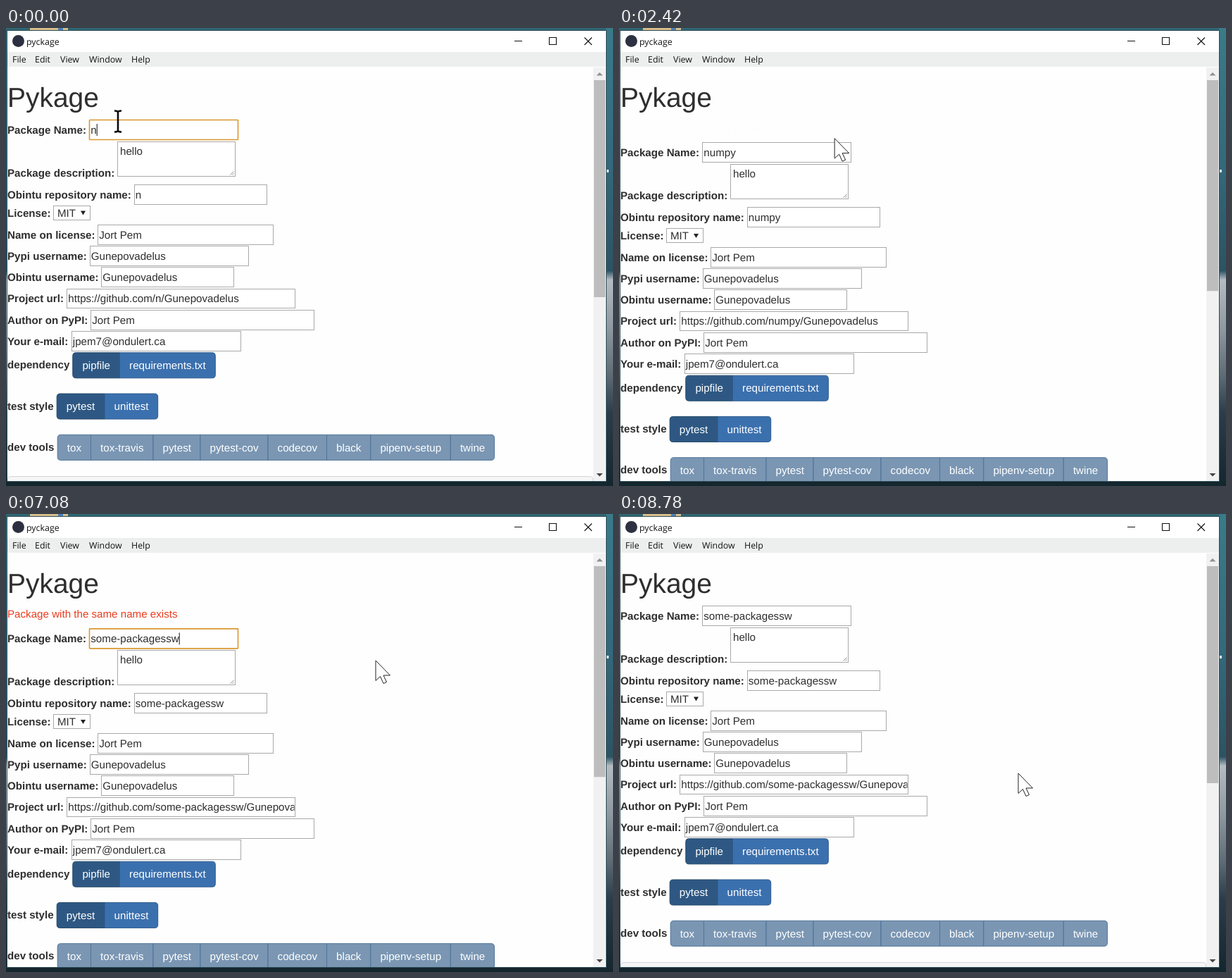
Recreate the animation shown at these times as an HTML page. Size 862 by 650 pixels, loop 8.86 s.

```html
<!DOCTYPE html>
<html lang="en">
<head>
<meta charset="utf-8">
<title>Pykage</title>
<style>
  html, body { margin: 0; width: 100%; height: 100%; overflow: hidden; background: #14262e; }
  svg { display: block; width: 862px; height: 650px; }
  text { font: 15.15px "Liberation Sans", Arial, sans-serif; fill: #2e2e2e; white-space: pre; text-rendering: geometricPrecision; }
  .ui { font: 12.4px "Open Sans", sans-serif; fill: #111; }
  .label { font-weight: bold; }
  .heading { font-size: 38.95px; }
  .on-blue { fill: #fff; }
  .box { fill: #fff; stroke: #a9a9a9; shape-rendering: crispEdges; }
</style>
</head>
<body>
<svg id="stage" viewBox="0 0 862 650"></svg>
<script>
const LOOP = 8860;
const STEP = 75;
const USER = "Gunepovadelus";
const PERSON = "Jort Pem";

const text = (x, y, content, cls = "", id = "") =>
  `<text x="${x}" y="${y}" class="${cls}" id="${id}">${content}</text>`;
const rect = (x, y, w, h, attrs) => `<rect x="${x}" y="${y}" width="${w}" height="${h}" ${attrs}/>`;
const box = (left, top, right, bottom) =>
  rect(left + 0.5, top + 0.5, right - left - 1, bottom - top - 1, 'class="box"');

// One labelled input; its text starts just inside the left edge.
const field = (label, left, right, baseline, value = "", id = "") =>
  text(2, baseline, label, "label") + box(left, baseline - 20, right, baseline + 9) +
  text(left + 2.3, baseline, value, "", id);

// Joined buttons: edges gives the left side of each and the right side of the last.
function buttons(label, top, edges, names, styleOf) {
  const last = names.length - 1;
  const right = edges[last + 1];
  let out = text(2, top + 22.5, label, "label");
  names.forEach((name, i) => {
    const [fill, stroke] = styleOf(i);
    const x = edges[i], end = edges[i + 1], r = 4.5;
    const a = i === 0 ? r : 0, b = i === last ? r : 0;
    out += `<path d="M${x + a} ${top}H${end - b}q${b} 0 ${b} ${b}V${top + 36 - b}q0 ${b} ${-b} ${b}
      H${x + a}q${-a} 0 ${-a} ${-a}V${top + a}q0 ${-a} ${a} ${-a}z" fill="${fill}" stroke="${stroke}"/>` +
      text(x + 13.6, top + 23.3, name, "on-blue");
  });
  return out;
}
const choice = i => i === 0 ? ["#2e5883", "#234868"] : ["#3b70ae", "#2d5b8d"];
const disabled = () => ["#7a96b3", "#4f7398"];

const desktop = `
  <defs>
    <linearGradient id="sky" x2="0" y2="1">
      <stop offset="0" stop-color="#3a7b89"/><stop offset=".3" stop-color="#33697b"/>
      <stop offset=".53" stop-color="#2c5364"/><stop offset=".55" stop-color="#b4bcc2"/>
      <stop offset=".66" stop-color="#8c979f"/><stop offset=".76" stop-color="#5d6b75"/>
      <stop offset=".84" stop-color="#2a3d49"/><stop offset="1" stop-color="#14262e"/>
    </linearGradient>
    <clipPath id="page">${rect(2, 55, 832, 588, "")}</clipPath>
    <clipPath id="urlClip">${rect(87, 360, 322.5, 50, "")}</clipPath>
  </defs>
  ${rect(0, 0, 862, 650, 'fill="url(#sky)"')}
  ${rect(0, 0, 852, 4, 'fill="#2f6774"')}
  ${rect(34, 0, 54, 3, 'fill="#d8bf8c"')}${rect(74, 0, 7, 3, 'fill="#4b83bd"')}
  ${rect(0, 644, 862, 6, 'fill="#14262e"')}
  ${rect(853, 201, 3, 4, 'fill="#dfe6e8"')}`;

const chrome = `
  ${rect(1, 3, 852, 641, 'fill="#2b4a55"')}
  ${rect(2, 4, 850, 30, 'fill="#fff"')}
  ${rect(2, 34, 850, 21.5, 'fill="#edefee"')}
  ${rect(2, 55, 850, 588, 'fill="#fefefe"')}
  <circle cx="17.5" cy="18.5" r="8.5" fill="#2d3040"/>
  ${text(29, 23.5, "pyckage", "ui")}
  ${[[9, "File"], [41, "Edit"], [77, "View"], [118, "Window"], [178, "Help"]]
    .map(([x, name]) => text(x, 49, name, "ui")).join("")}
  <path d="M722 18.5h11M771.5 13.5h10v10h-10zM821.5 13.5l10.5 10.5m0-10.5l-10.5 10.5"
    fill="none" stroke="#111" stroke-width="1.1"/>
  ${rect(834, 56, 18, 587, 'fill="#f1f1f1"')}
  ${rect(835, 74, 16, 308, 'fill="#bdbdbd" id="thumb"')}
  <path d="M838.5 67.5h9l-4.5-4.5z" fill="#909090"/>
  <path d="M838.5 632h9l-4.5 4.5z" fill="#444"/>`;

const form = `
  ${field("Package Name:", 118, 330, 150, "", "name")}
  ${rect(118.5, 130.5, 211, 28, 'id="ring" rx="1" fill="none" stroke="#d9972f" stroke-width="1.6"')}
  ${rect(0, 136, 1, 17, 'id="caret" fill="#111"')}
  ${text(2, 211, "Package description:", "label")}${box(158, 161, 326, 211)}
  <path d="M318.5 208.5l5-5m-2 5l2-2" stroke="#888"/>
  ${text(162, 180, "hello")}
  ${field("Obintu repository name:", 181.5, 371, 241.5, "", "repo")}
  ${text(2, 268, "License:", "label")}${box(67, 252, 120, 273)}
  ${text(73, 268, "MIT")}<path d="M106 259.5h7l-3.500 6z" fill="#222"/>
  ${field("Name on license:", 130, 380, 298.5, PERSON)}
  ${field("Pypi username:", 118.5, 345, 329, USER)}
  ${field("Obintu username:", 135, 324, 359, USER)}
  ${text(2, 389, "Project url:", "label")}${box(86, 369.5, 411, 398)}
  <g clip-path="url(#urlClip)">${text(88.3, 389, "", "", "url")}</g>
  ${field("Author on PyPI:", 120, 438, 419.5, PERSON)}
  ${field("Your e-mail:", 92.5, 334, 450, "jpem7@ondulert.ca")}
  ${buttons("dependency", 460.8, [94.8, 161.5, 297.3], ["pipfile", "requirements.txt"], choice)}
  ${buttons("test style", 519, [72.2, 140, 215.7], ["pytest", "unittest"], choice)}
  ${buttons("dev tools", 577.3, [73.2, 120.5, 209, 276, 372, 455.5, 517.8, 631.3, 693.5],
    ["tox", "tox-travis", "pytest", "pytest-cov", "codecov", "black", "pipenv-setup", "twine"], disabled)}
  ${rect(2.5, 636.5, 831, 40, 'rx="4" fill="#f6f6f6" stroke="#d4d4d4"')}`;

const page = `<g clip-path="url(#page)">
  ${text(2, 112, "Pykage", "heading")}
  <g id="message">${text(2, 146.5, "Package with the same name exists", "", "warning")}</g>
  <g id="alert">
    ${rect(2, 130.5, 831.5, 56, 'rx="4" fill="#dbebd2" stroke="#cbe2bf"')}
    ${text(19.5, 164, "Package name available", "", "success")}
  </g>
  <g id="form">${form}</g>
</g>`;

const pointer = `<g id="pointer">
  <circle id="press" r="13" fill="#ff0" opacity=".72"/>
  <path id="arrow" d="M0 0v28.500l6.500-6 4.500 10 4.500-2-4.500-9.500h9.500z" fill="#fff" stroke="#222"/>
  <path id="beam" d="M-5-14.500q4 0 5 1.500 1-1.500 5-1.500M0-13v27M-5 15.500q4 0 5-1.500 1 1.500 5 1.500"
    fill="none" stroke="#0a0a0a" stroke-width="2.600"/>
</g>`;

document.getElementById("stage").innerHTML = desktop + chrome + page + pointer;
const el = id => document.getElementById(id);
el("warning").style.fill = "#ea3c1e";
el("success").style.fill = "#43734a";
el("name").insertAdjacentHTML("beforebegin", rect(0, 135, 0, 19, 'id="selection" fill="#3390f5"'));

const entries = [
  { word: "numpy", keys: [0, 170, 320, 390, 560] },
  { word: "some-packagessw",
    keys: [4670, 4670, 4750, 4900, 5070, 5220, 5370, 5600, 5680, 5830, 5910, 5990, 6530, 6780, 6930] },
];
// Pointer moves: start, end, target x, target y.
const moves = [
  [1260, 1410, 609, 247], [1730, 2040, 324, 155], [2420, 2960, 181, 168], [3590, 3740, 66, 168],
  [3820, 3970, 173, 89], [6930, 7080, 525, 208], [7390, 7790, 471, 140], [8250, 8780, 567, 368],
];
const within = (t, from, to) => t >= from && t < to;
const clamp = v => Math.max(0, Math.min(1, v));
const show = (id, on) => el(id).setAttribute("visibility", on ? "visible" : "hidden");

function pointerAt(t) {
  let x = 159, y = 132;
  for (const [start, end, toX, toY] of moves) {
    if (t < start) break;
    const steps = Math.round((end - start) / STEP) + 1;
    const p = clamp((Math.floor((t - start) / STEP) + 1) / steps);
    x += (toX - x) * p;
    y += (toY - y) * p;
  }
  return [x, y];
}

function draw(t) {
  const { word, keys } = entries[t < 4670 ? 0 : 1];
  const typed = keys.filter(k => k <= t);
  const name = word.slice(0, typed.length);
  el("name").textContent = el("repo").textContent = name;
  el("url").textContent = `https://github.com/${name}/${USER}`;

  const shift = t < 1490 ? 0 : t < 8170 ? 32.4 : t < 8550 ? 77.7 : 0;
  el("form").setAttribute("transform", `translate(0 ${shift})`);
  el("thumb").setAttribute("height", 308 - shift * 0.27);
  el("message").setAttribute("opacity", t < 7160 ? clamp((t - 2420) / 300) : clamp(1 - (t - 7160) / 300));
  show("alert", within(t, 8170, 8550));

  const [x, y] = pointerAt(t);
  const focused = t < 1490 || within(t, 3510, 7160);
  const selecting = within(t, 3590, 4670);
  const textEnd = 120.3 + el("name").getComputedTextLength();
  const selectFrom = t < 3740 ? Math.min(textEnd, Math.max(120.3, x)) : 120.3;
  show("selection", selecting);
  el("selection").setAttribute("x", selectFrom);
  el("selection").setAttribute("width", textEnd - selectFrom);
  el("name").style.fill = selecting && t >= 3740 ? "#fff" : "";

  const awake = within(t, 3510, 4670) ? 3510 : typed[typed.length - 1];
  show("ring", focused);
  show("caret", focused && !selecting && (t - awake) % 1060 < 530);
  el("caret").setAttribute("x", textEnd);

  const beam = t < 1260 || within(t, 2650, 6930);
  el("pointer").setAttribute("transform", `translate(${x} ${y})`);
  show("beam", beam);
  show("arrow", !beam);
  show("press", within(t, 1490, 1650) || within(t, 3510, 3820) || within(t, 7160, 7310));
}

const begin = performance.now();
function tick() {
  draw((performance.now() - begin) % LOOP);
  requestAnimationFrame(tick);
}
tick();
</script>
</body>
</html>
```
